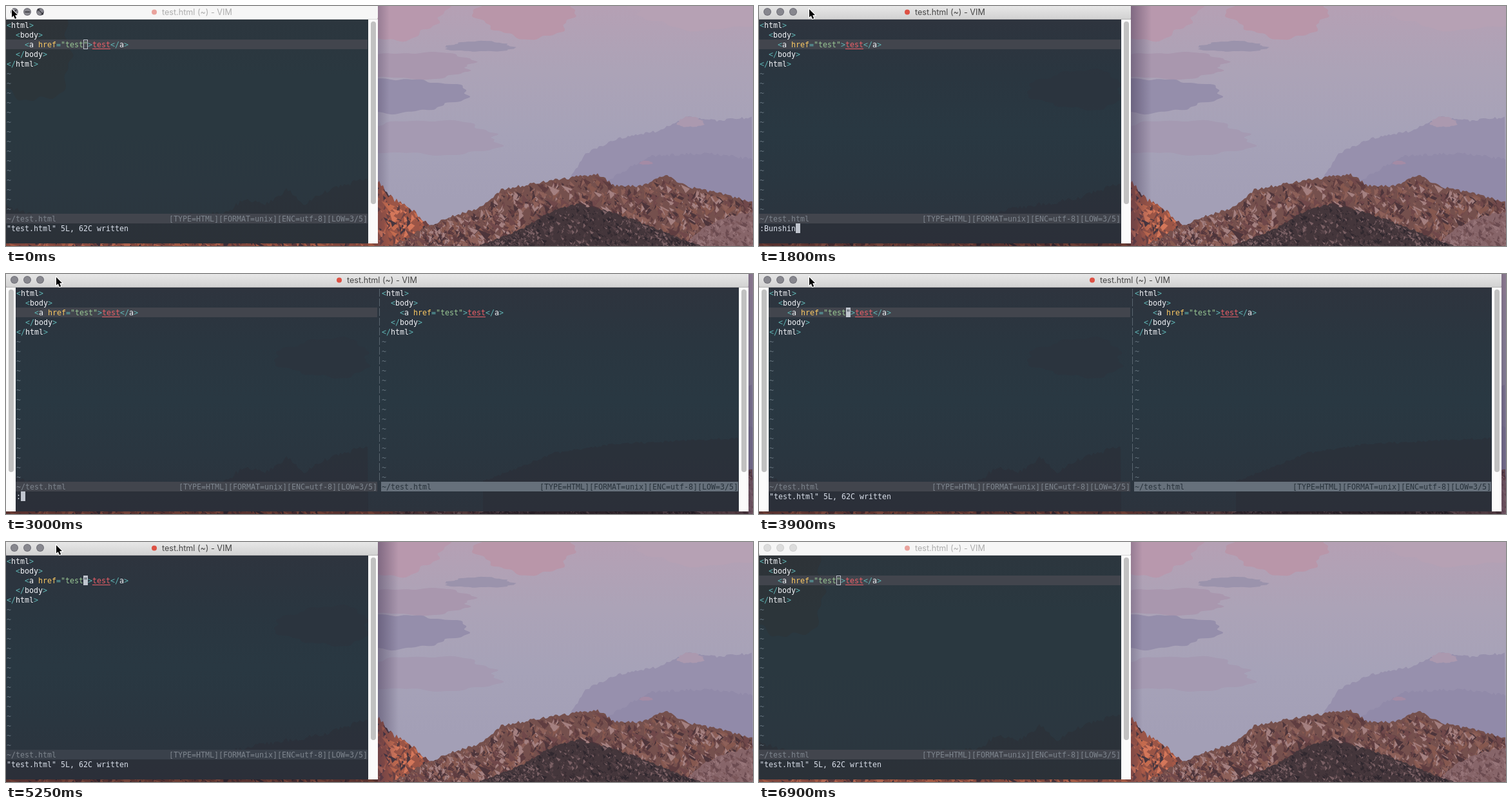
Animation, 1159 px wide and 372 px high, one loop 7050 ms. Source, as an HTML page with a canvas:

```html
<!DOCTYPE html>
<html lang="en">
<head>
<meta charset="utf-8">
<title>Split editor</title>
<style>
html, body { margin: 0; width: 100%; height: 100%; overflow: hidden; background: #a9a3b8; }
canvas { display: block; }
</style>
</head>
<body>
<canvas id="stage" width="1159" height="372"></canvas>
<script>
const W = 1159, H = 372, LOOP = 7050, STEP = 150;
const CELL = 7, ROW = 15, TOP = 22;
const MONO = '11.63px "DejaVu Sans Mono", monospace';
const WHITE = '#d8dee9', BRIGHT = '#f2f4f8', TEAL = '#5fb3b3', YELLOW = '#fac863',
      GREEN = '#99c794', RED = '#ec5f67', DIM = '#65737e', LINE = '#42454d';
const WRITTEN = '"test.html" 5L, 62C written';
const STATUS = '[TYPE=HTML][FORMAT=unix][ENC=utf-8][LOW=3/5]';

const stage = document.getElementById('stage').getContext('2d');
let c = stage;

const points = s => s.split(' ').map(p => p.split(',').map(Number));

function random(seed) {
  return () => (seed = (seed * 16807) % 2147483647) / 2147483647;
}

function rect(x, y, w, h, fill) {
  c.fillStyle = fill;
  c.fillRect(x, y, w, h);
}

function rounded(x, y, w, h, r, fill) {
  c.beginPath();
  c.roundRect(x, y, w, h, r);
  c.fillStyle = fill;
  c.fill();
}

function disc(x, y, r, fill) {
  c.beginPath();
  c.arc(x, y, r, 0, 7);
  c.fillStyle = fill;
  c.fill();
}

function ramp(x0, y0, x1, y1, ...stops) {
  const g = c.createLinearGradient(x0, y0, x1, y1);
  stops.forEach((s, i) => g.addColorStop(i / (stops.length - 1), s));
  return g;
}

// Wavy ellipse
function cloud(x, y, rx, ry, fill) {
  c.beginPath();
  for (let a = 0; a < 6.28; a += 0.05) {
    const r = 1 + 0.1 * Math.sin(3 * a + x) + 0.06 * Math.sin(8 * a + y) + 0.03 * Math.sin(19 * a);
    c.lineTo(x + rx * r * Math.cos(a), y + ry * r * Math.sin(a));
  }
  c.fillStyle = fill;
  c.fill();
}

// Jagged skyline through a few key points, with optional random facets below it
function ridge(keys, fill, rough = 3, facets = 0, size = 0, colors = [], bottom = H) {
  const p = points(keys), left = p[0][0], right = p[p.length - 1][0];
  const rnd = random(Math.round(left + right * 7));
  const height = x => {
    const i = Math.max(1, p.findIndex(q => q[0] >= x));
    const [x0, y0] = p[i - 1], [x1, y1] = p[i];
    return y0 + (y1 - y0) * (x - x0) / (x1 - x0);
  };
  c.save();
  c.beginPath();
  c.moveTo(left, bottom);
  for (let x = left; x <= right; x += 3) c.lineTo(x, height(x) + (rnd() - 0.5) * rough);
  c.lineTo(right, bottom);
  c.fillStyle = fill;
  c.fill();
  c.clip();
  for (let i = 0; i < facets; i++) {
    const x = left + rnd() * (right - left), top = height(x);
    const y = top + rnd() * (bottom - top), len = size * (0.2 + rnd() ** 2);
    const lean = len * (rnd() * 1.6 - 0.6);
    c.beginPath();
    c.moveTo(x, y);
    c.lineTo(x + lean, y + len);
    c.lineTo(x + lean + len * 0.5, y + len * 0.5);
    c.fillStyle = colors[i % colors.length];
    c.fill();
  }
  c.restore();
}

function wallpaper() {
  rect(0, 0, W, H, ramp(0, 0, 0, 300, '#b5a0b4', '#aca3b7', '#a6a2b8', '#a39fb6'));
  cloud(600, 10, 82, 40, '#b898ad');
  cloud(620, 92, 110, 20, '#a997ae');
  cloud(808, 14, 76, 34, '#b996a9');
  cloud(735, 63, 52, 8, '#9b93ac');
  cloud(1090, 0, 130, 34, '#b6a1b4');
  cloud(618, 138, 92, 26, '#958eab');
  cloud(640, 205, 130, 26, '#a59ab2');
  ridge('860,290 900,228 950,205 1010,194 1060,172 1100,178 1159,172', '#9790ad', 4);
  ridge('900,290 1000,232 1090,228 1159,238', '#918aa9', 5);
  cloud(1062, 180, 20, 8, '#ab99af');
  cloud(993, 243, 10, 3, '#a48ba5');

  ridge('0,290 90,330 300,320 450,288 577,272 600,300 625,310 650,336 700,360', '#9b5546', 8,
    1500, 16, ['#c46b4e', '#47363f', '#d4775a', '#6e4343', '#a85a48']);
  ridge('600,372 650,343 690,327 740,310 770,284 850,270 918,260 945,279 985,279 1026,261 1055,280 1100,289 1159,304',
    '#75504d', 5, 2400, 14, ['#5f3d40', '#86584f', '#70484a', '#8d6059', '#4d353b', '#a48080']);
  ridge('1050,372 1085,342 1115,328 1159,318', '#876569', 4,
    350, 9, ['#795659', '#967478', '#6b4b50']);
  ridge('735,372 800,346 850,316 885,307 930,316 990,338 1078,372', '#44363b', 4,
    1300, 7, ['#30282f', '#554247', '#3a2e34', '#7a6064']);
}

function backdrop() {
  const cv = document.createElement('canvas');
  cv.width = W;
  cv.height = H;
  c = cv.getContext('2d');
  wallpaper();
  c = stage;
  return cv;
}
const scene = backdrop();

// Draws runs of [text, colour, underlined?] from a cell edge
function write(x, row, ...runs) {
  const y = TOP + row * ROW;
  c.font = MONO;
  for (const [text, color, under] of runs) {
    c.fillStyle = color;
    c.fillText(text, x, y + 12);
    if (under) c.fillRect(x, y + 14, text.length * CELL, 1);
    x += text.length * CELL;
  }
}

function statusBar(x, cols, bg, fg) {
  rect(x - 1, TOP + 20 * ROW, cols * CELL + 1, ROW, bg);
  write(x, 20, ['~/test.html', fg]);
  write(x + (cols - STATUS.length) * CELL, 20, [STATUS, fg]);
}

function pane(x, cols, lit) {
  if (lit) rect(x - 1, TOP + 2 * ROW, cols * CELL + 1, ROW, LINE);
  const tag = (name, open = '<') => [[open, TEAL], [name, BRIGHT], ['>', TEAL]];
  write(x, 0, ...tag('html'));
  write(x + 2 * CELL, 1, ...tag('body'));
  write(x + 4 * CELL, 2, ['<', TEAL], ['a', BRIGHT], [' href', YELLOW], ['=', TEAL],
    ['"test"', GREEN], ['>', TEAL], ['test', RED, true], ...tag('a', '</'));
  write(x + 2 * CELL, 3, ...tag('body', '</'));
  write(x, 4, ...tag('html', '</'));
  for (let r = 5; r < 20; r++) write(x, r, ['~', DIM]);
}

function cursor(x, row, glyph, hollow) {
  const y = TOP + row * ROW;
  if (hollow) {
    c.strokeStyle = '#c0c5ce';
    c.lineWidth = 1;
    c.strokeRect(x + 0.5, y + 0.5, CELL - 1, ROW - 1);
  } else {
    rect(x, y, CELL, ROW, '#c0c5ce');
    write(x, row, [glyph, '#2b3640']);
  }
}

function buttons(active, hover) {
  const dark = active || hover;
  ['×', '−', '⤡'].forEach((sign, i) => {
    const x = 13 + 20 * i;
    disc(x, 9, 6, dark ? '#707078' : '#cecece');
    disc(x, 9, 5, dark ? '#87878e' : '#dcdcdc');
    if (!hover) return;
    c.font = 'bold 12px "DejaVu Sans", sans-serif';
    c.textAlign = 'center';
    c.fillStyle = '#2e2e34';
    c.fillText(sign, x, 13);
    c.textAlign = 'left';
  });
}

function titleBar(width, active, hover) {
  rounded(0, -6, width, 27, 4, active ? ramp(0, 0, 0, 21, '#e7e7e7', '#d1d1d1') : '#f6f6f6');
  rect(0, 20, width, 1, active ? '#b4b4b4' : '#d8d8d8');
  buttons(active, hover);
  const x = width > 600 ? 529 : 242;
  disc(x - 12, 9.5, 4, active ? '#dd5144' : '#eaa39d');
  c.font = '12.6px Inter, sans-serif';
  c.fillStyle = active ? '#454545' : '#adadad';
  c.fillText('test.html (~) - VIM', x, 14);
}

function scrollbar(x) {
  rect(x, 21, 15, 347, '#fbfbfb');
  rounded(x + 4, 24, 8, 283, 4, '#c1c1c1');
}

// Dark window body with the wallpaper faintly showing through
function glass(width, active, split) {
  rect(0, 21, width, 347, active
    ? ramp(0, 21, 0, 368, '#2e343e', '#2a3640', '#293842', '#2a3640', '#2c333d')
    : ramp(0, 21, 0, 368, '#2c363e', '#2a3840', '#2a3840', '#2b3740', '#2b363e'));
  if (active) cloud(495, 130, 72, 30, 'rgba(48,49,59,.3)');
  else cloud(30, 70, 75, 75, 'rgba(50,48,48,.35)');
  const rock = active ? 'rgba(42,42,52,.45)' : 'rgba(44,43,48,.4)';
  const far = active && !split ? '0,338 340,326 400,312 490,300 562,274'
    : '0,310 60,332 340,322 370,298 400,308 438,284 465,308 495,288 562,266';
  ridge(far, rock, 8, 0, 0, [], 368);
  if (split) ridge('740,322 850,278 940,264 1137,254', rock, 4, 0, 0, [], 368);
}

function pointer(x, y) {
  c.save();
  c.translate(x, y);
  c.beginPath();
  points('0,0 0,12.5 2.8,10 4.9,15 7.2,14 5.1,9.2 9,9').forEach(p => c.lineTo(...p));
  c.closePath();
  c.lineWidth = 2;
  c.strokeStyle = '#fff';
  c.stroke();
  c.fillStyle = '#000';
  c.fill();
  c.restore();
}

function ease(t, a, b) {
  const u = Math.min(1, Math.max(0, (t - a) / (b - a)));
  return u * u * (3 - 2 * u);
}

function mouseAt(t) {
  const enter = ease(t, 0, 600), leave = ease(t, 6150, 6750);
  return [9 + 69 * enter + 530 * leave, 5 + 345 * leave];
}

// Text of the command line; a leading colon means it is being typed
function command(t) {
  const typed = (text, start, pace) => text.slice(0, 1 + Math.floor((t - start) / pace));
  if (t < 1050) return WRITTEN;
  if (t < 1950) return typed(':Bunshin', 1050, 105);
  if (t < 2850) return '';
  if (t < 3750) return typed(':wq', 2850, 300);
  return WRITTEN;
}

function draw(t) {
  const active = t >= 750 && t < 6900;
  const split = t >= 1950 && t < 4050;
  const lit = t < 4050 || t >= 6000;
  const width = split ? 1152 : 577, x = split ? 16 : 1;
  const [mx, my] = mouseAt(t);

  c.drawImage(scene, 0, 0);
  const reach = active ? 32 : 18;
  rect(width, 0, reach, H, ramp(width, 0, width + reach, 0,
    `rgba(50,40,70,${active ? 0.42 : 0.25})`, 'rgba(50,40,70,0)'));
  rect(0, 368, width, 4, `rgba(20,14,24,${active ? 0.5 : 0.2})`);

  glass(width, active, split);
  pane(x, 80, lit);
  statusBar(x, 80, lit ? LINE : '#3a414b', '#7d848d');
  if (split) {
    pane(583, 79, false);
    statusBar(583, 79, '#66707b', '#27313a');
    for (let r = 0; r < 20; r++) rect(579, TOP + r * ROW + 1, 1, 12, '#59656f');
    scrollbar(0);
  }
  scrollbar(width - 15);
  titleBar(width, active, mx < 65);

  const line = command(t), quote = x + 17 * CELL;
  const blinkOn = (t - (t < 4050 ? 1950 : 4050) + 9000) % 900 < 450;
  write(x, 21, [line, WHITE]);
  if (line[0] == ':') cursor(x + line.length * CELL, 21, '');
  else if (!active) cursor(quote, 2, '', true);
  else if (blinkOn) cursor(quote, 2, '"');

  if (t < 6900) pointer(mx, my);
}

function frame(now) {
  draw(Math.floor((now % LOOP) / STEP) * STEP);
  requestAnimationFrame(frame);
}
requestAnimationFrame(frame);
</script>
</body>
</html>
```
